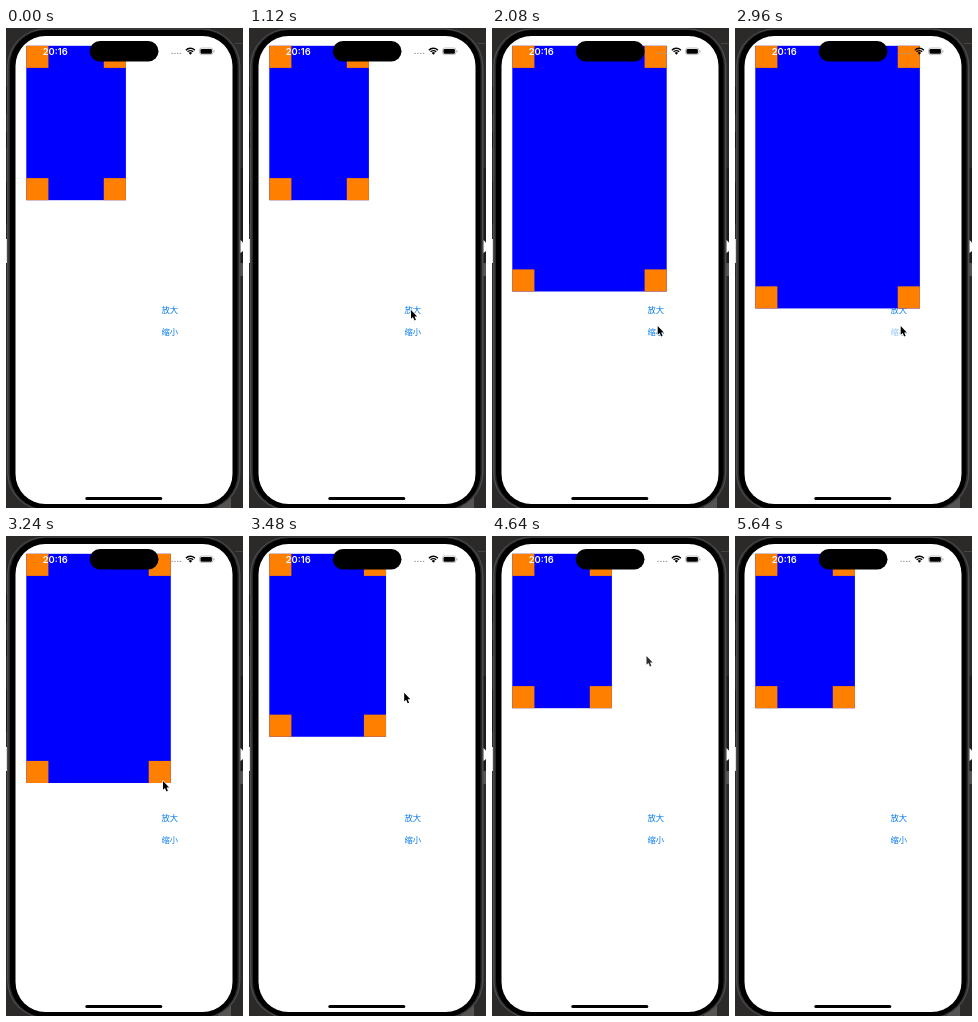
Recreate the animation shown at these times as an HTML page with a canvas. Size 237 by 480 pixels, loop 6160 ms.

```html
<!DOCTYPE html>
<html lang="zh">
<head>
<meta charset="utf-8">
<title>放大 / 缩小</title>
<style>
html, body { margin: 0; width: 100%; height: 100%; overflow: hidden; background: #2b2a28; }
canvas { display: block; width: 237px; height: 480px; }
</style>
</head>
<body>
<canvas id="stage"></canvas>
<script>
const W = 237, H = 480, LOOP = 6160, STEP = 40;
const canvas = document.getElementById('stage');
const ctx = canvas.getContext('2d');
const dpr = window.devicePixelRatio || 1;
canvas.width = W * dpr;
canvas.height = H * dpr;
ctx.scale(dpr, dpr);

const GROW = 1407, SHRINK = 2868, DURATION = 945;
const FONT = '"Noto Sans CJK SC", "Noto Sans CJK", sans-serif';

// Pointer path: time, x, y of the tip
const PATH = [
  [520, 175, 345], [760, 171, 322], [1080, 162, 282],
  [1800, 162, 282], [2040, 165.7, 298], [3080, 165.7, 298],
  [3240, 157, 245], [3420, 155, 165], [3640, 156, 120],
  [3760, 156, 118.5], [4240, 154.5, 120]
];

const clamp = v => Math.max(0, Math.min(1, v));
const smooth = v => v * v * (3 - 2 * v);

// cubic-bezier(.42, 0, .58, 1)
function easeInOut(x) {
  if (x <= 0 || x >= 1) return clamp(x);
  let lo = 0, hi = 1;
  for (let i = 0; i < 24; i++) {
    const s = (lo + hi) / 2, r = 1 - s;
    const v = 1.26 * s * r * r + 1.74 * s * s * r + s * s * s;
    if (v < x) lo = s; else hi = s;
  }
  return smooth(lo);
}

function rect(x, y, w, h, color) {
  ctx.fillStyle = color;
  ctx.fillRect(x, y, w, h);
}

function round(x, y, w, h, r, color) {
  ctx.fillStyle = color;
  ctx.beginPath();
  ctx.roundRect(x, y, w, h, r);
  ctx.fill();
}

function text(str, x, y, font, color) {
  ctx.font = font;
  ctx.fillStyle = color;
  ctx.textAlign = 'center';
  ctx.textBaseline = 'alphabetic';
  ctx.fillText(str, x, y);
}

function drawPhone() {
  rect(0, 0, W, H, '#2b2a28');
  rect(229, 15, 8, 1, '#454442');
  rect(212, 470, 13, 10, '#555452');
  [[59, 27], [104, 16], [154, 42]].forEach(([y, h]) => rect(0, y, 2, h, '#161616'));
  rect(0, 211, 1, 24, '#ddd');
  rect(234, 140, 3, 95, '#1c1c1c');
  rect(234, 235, 3, 13, '#555');
  round(1, 0.5, 233.5, 482, 38, '#4b4b4d');
  round(2.5, 1.5, 230.5, 480, 36.5, '#28282a');
  round(4, 2, 227.5, 479, 35.5, '#000');
  round(9.5, 8, 217, 468, 30, '#fff');
  ctx.fillStyle = '#fff';
  ctx.beginPath();
  ctx.moveTo(234.5, 212);
  ctx.lineTo(237, 214.5);
  ctx.lineTo(237, 223);
  ctx.lineTo(234.5, 225);
  ctx.fill();
}

function drawPanel(p) {
  const x = 20.3, y = 17.8, w = 99.6 + 66.2 * p, h = 154.4 + 110.3 * p, c = 22.1;
  rect(x, y, w, h, '#0000ff');
  for (const cx of [x, x + w - c])
    for (const cy of [y, y + h - c]) rect(cx, cy, c, c, '#ff8000');
}

function drawStatus() {
  text('20:16', 49.2, 26.8, '600 9.4px Inter, "Liberation Sans", sans-serif', '#fff');
  round(83.7, 13, 68.8, 20.5, 10.25, '#000');
  for (let i = 0; i < 4; i++) round(165.3 + i * 2.8, 24.8, 1.6, 1.3, 0.6, '#a0a0a0');

  ctx.strokeStyle = '#000';
  ctx.lineWidth = 1.4;
  for (const r of [6.2, 3.9]) {
    ctx.beginPath();
    ctx.arc(184.4, 26.5, r, -Math.PI * 0.76, -Math.PI * 0.24);
    ctx.stroke();
  }
  ctx.fillStyle = '#000';
  ctx.beginPath();
  ctx.moveTo(184.4, 26.7);
  ctx.arc(184.4, 26.5, 2.3, -Math.PI * 0.76, -Math.PI * 0.24);
  ctx.fill();

  ctx.strokeStyle = '#999';
  ctx.lineWidth = 0.6;
  ctx.beginPath();
  ctx.roundRect(193.6, 20, 13.2, 6.6, 2);
  ctx.stroke();
  round(194.5, 20.9, 11.4, 4.8, 1.3, '#000');
  round(207.5, 22.2, 0.9, 2.2, 0.5, '#999');
}

// Title dims while pressed, then fades back after release
function titleAlpha(t, release) {
  if (t < release - 120) return 1;
  return t < release ? 0.25 : 0.25 + 0.75 * clamp((t - release) / 400);
}

function drawButton(label, y, alpha) {
  ctx.globalAlpha = alpha;
  text(label, 163.8, y, '8.3px ' + FONT, '#087bec');
  ctx.globalAlpha = 1;
}

function pointerAt(t) {
  let i = 1;
  while (i < PATH.length - 1 && t > PATH[i][0]) i++;
  const [t0, x0, y0] = PATH[i - 1], [t1, x1, y1] = PATH[i];
  const k = smooth(clamp((t - t0) / (t1 - t0)));
  return [x0 + (x1 - x0) * k, y0 + (y1 - y0) * k];
}

function drawPointer(t) {
  if (t < 520 || t >= 5000) return;
  const [x, y] = pointerAt(t);
  ctx.save();
  ctx.globalAlpha = 1 - clamp((t - 4560) / 440);
  ctx.translate(x, y);
  ctx.scale(0.94, 0.94);
  ctx.beginPath();
  ctx.moveTo(0, 0);
  [[0, 9.4], [2.1, 7.5], [3.7, 11.2], [5.2, 10.5], [3.7, 7], [6.5, 6.8]]
    .forEach(([px, py]) => ctx.lineTo(px, py));
  ctx.closePath();
  ctx.lineJoin = 'round';
  ctx.lineWidth = 1.3;
  ctx.strokeStyle = '#fff';
  ctx.stroke();
  ctx.fillStyle = '#000';
  ctx.fill();
  ctx.restore();
}

function draw(t) {
  const size = easeInOut((t - GROW) / DURATION) - easeInOut((t - SHRINK) / DURATION);
  drawPhone();
  drawButton('放大', 285, titleAlpha(t, GROW));
  drawButton('缩小', 307, titleAlpha(t, SHRINK));
  drawPanel(size);
  drawStatus();
  round(79.3, 469, 77, 3, 1.5, '#000');
  drawPointer(t);
}

const start = performance.now();
function tick() {
  const t = (performance.now() - start) % LOOP;
  draw(Math.floor(t / STEP) * STEP);
  requestAnimationFrame(tick);
}
tick();
</script>
</body>
</html>
```
